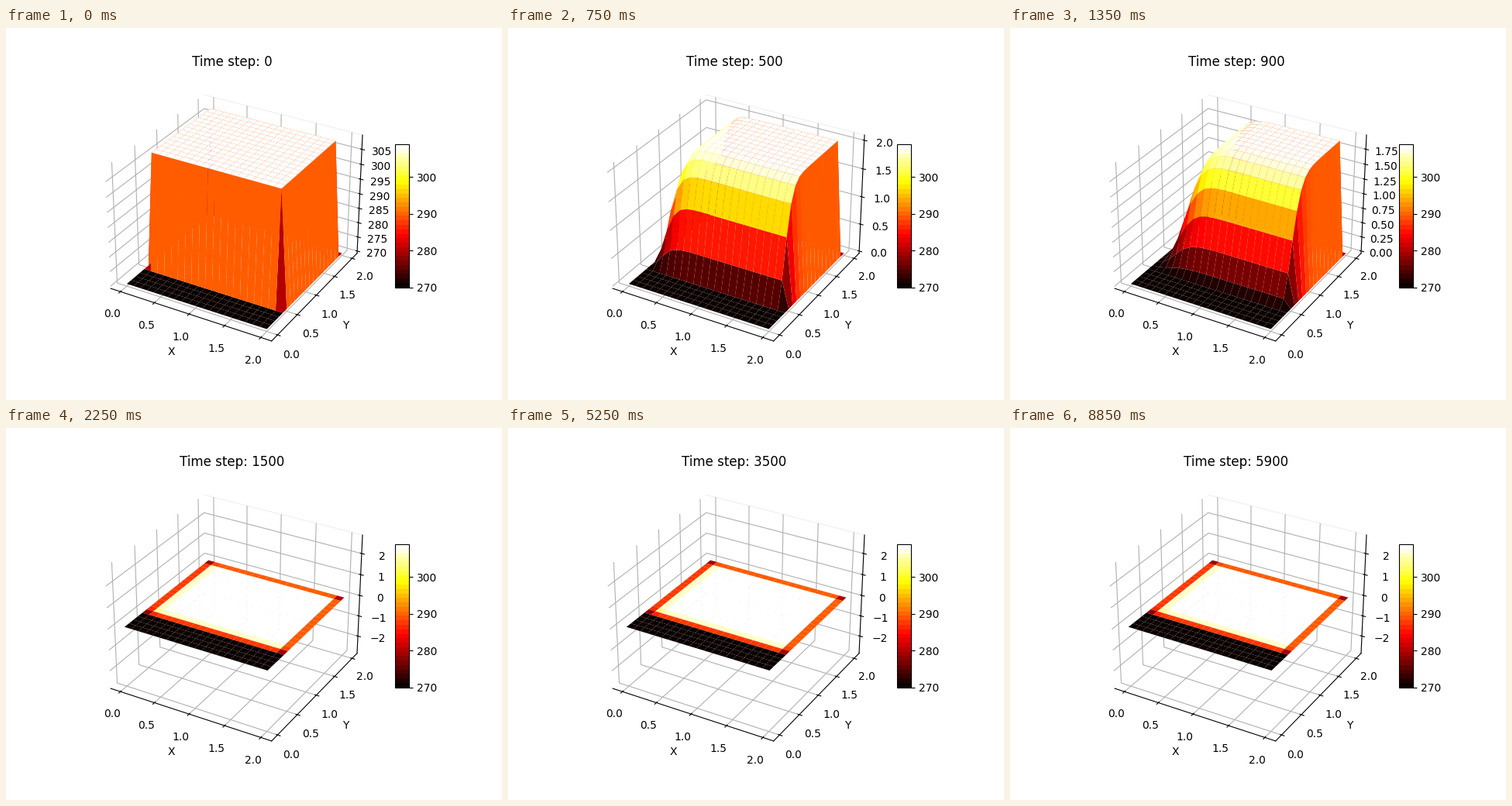
These frames come from a looping animation (640 px wide and 480 px high, 9000 ms). A matplotlib script:

```python
import math

import numpy as np
import matplotlib.pyplot as plt
from matplotlib.animation import FuncAnimation
from matplotlib.cm import ScalarMappable
from matplotlib.colors import Normalize
from matplotlib.ticker import MaxNLocator

FRAMES, INTERVAL, STEP = 60, 150, 100
N = 21                    # grid nodes per side
BASE, RISE = 270, 38.9    # ambient temperature and height of the hot block
COURANT = 0.00294         # upwind drift in cells per step
DECAY = 0.2557            # decades lost per 100 steps (fractional part)
FLAT, FROZEN = 1200, 1300

grid = np.linspace(0, 2, N)
X, Y = np.meshgrid(grid, grid)


def padded(lo, hi):
    pad = (hi - lo) / 48
    return lo - pad, hi + pad


def front(first, lam):
    """Upwind-smeared edge starting at node `first`, zero at both borders."""
    k = np.arange(N - 1 - first)
    fact = np.array([math.factorial(int(j)) for j in k], float)
    out = np.zeros(N)
    out[first:-1] = np.cumsum(np.exp(-lam) * lam ** k / fact)
    return out


def field(step):
    lam = 0.11 if step >= FROZEN else COURANT * step
    return np.outer(front(5, lam), front(1, lam))


def scene(step):
    """Heights, z range and z ticks at a time step."""
    u = field(step)
    if step >= FLAT:
        return u * 1e-6, -2.75, 2.75, np.arange(-2, 3)
    if step == 0:
        lo, top = BASE, RISE
    else:
        lo, top = 0, 10 ** ((math.log10(RISE) - DECAY * step / 100) % 1)
    locator = MaxNLocator(nbins=8, steps=[1, 2, 2.5, 5, 10])
    ticks = locator.tick_values(lo, lo + top)
    ticks = ticks[(ticks >= lo) & (ticks <= lo + top)]
    return lo + top * u / u.max(), lo, lo + top, ticks


fig = plt.figure(figsize=(6.4, 4.8), dpi=100)
ax = fig.add_subplot(projection="3d")
scale = ScalarMappable(Normalize(BASE, BASE + RISE), plt.get_cmap("hot", 32))
fig.colorbar(scale, ax=ax, shrink=0.5, aspect=10)

ax.set_xlabel("X")
ax.set_ylabel("Y")
ax.set_xticks(np.arange(0, 2.1, 0.5))
ax.set_yticks(np.arange(0, 2.1, 0.5))
ax.set_xlim(*padded(-0.1, 2.1))
ax.set_ylim(*padded(-0.1, 2.1))
for axis in (ax.xaxis, ax.yaxis, ax.zaxis):
    axis.set_pane_color((1, 1, 1, 1))
ax.yaxis.pane.set_edgecolor("#f2f2f2")

surface = None


def update(i):
    global surface
    if surface is not None:
        surface.remove()
    step = i * STEP
    z, lo, hi, ticks = scene(step)
    surface = ax.plot_surface(X, Y, z, cmap="hot", linewidth=0)
    ax.set_zticks(ticks)
    ax.set_zlim(*padded(lo, hi))
    ax.set_title(f"Time step: {step}")
    return []


anim = FuncAnimation(fig, update, frames=FRAMES, interval=INTERVAL,
                     repeat=True, repeat_delay=0, blit=False)
plt.show()
```
